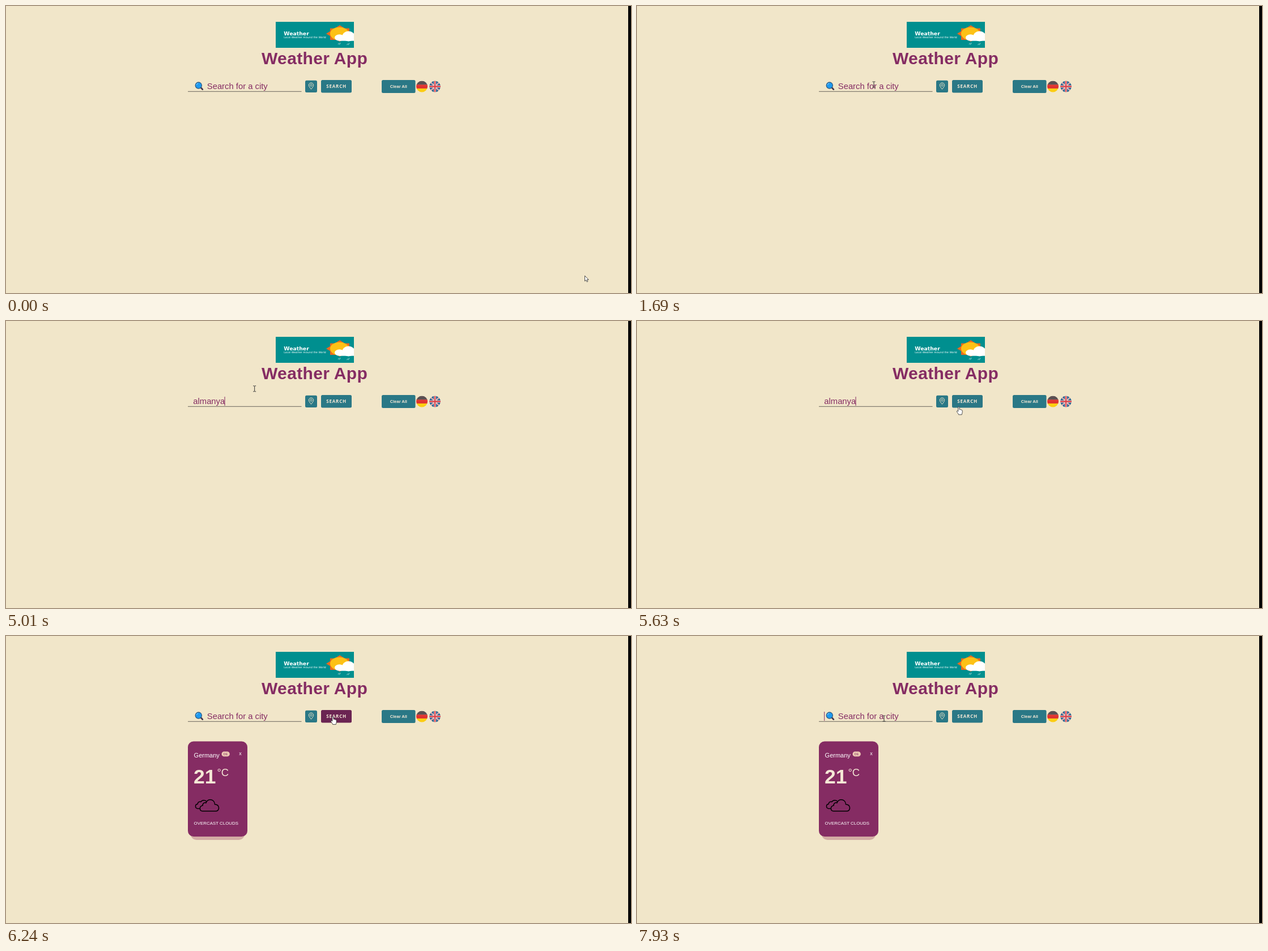
Write an HTML page that moves like this. It is 1103 px wide and 508 px high and loops after 8 s.

```html
<!DOCTYPE html>
<html lang="en">
<head>
<meta charset="utf-8">
<title>Weather App</title>
<style>
html, body { margin: 0; width: 100%; height: 100%; overflow: hidden; background: #f1e6c9; }
svg { display: block; width: 1103px; height: 508px; }
text { font-family: "Liberation Sans", Arial, sans-serif; white-space: pre; }
.b { font-weight: bold; }
.wide { font-family: "DejaVu Sans", sans-serif; fill: #fff; }
.label { font: bold 8px "Open Sans", sans-serif; letter-spacing: .8px; }
.btn { fill: #2a7886; }
.cream { fill: #f5e8d6; }
.plum { fill: #852c63; }
.input { font-size: 14.8px; }
</style>
</head>
<body>
<svg viewBox="0 0 1103 508">
  <defs>
    <clipPath id="banner"><rect x="476" y="28" width="138" height="46"/></clipPath>
    <clipPath id="disc"><circle r="10"/></clipPath>
  </defs>
  <rect width="1103" height="508" fill="#f1e6c9"/>
  <rect x="1098" width="5" height="508"/>

  <g clip-path="url(#banner)">
    <rect x="476" y="28" width="138" height="46" fill="#008f8f"/>
    <text class="wide b" x="490.3" y="51.5" font-size="9.3">Weather</text>
    <text class="wide" x="490.3" y="56.6" font-size="4.6">Local Weather Around the World</text>
    <path d="M572 39.5H606V60H572ZM565 49L589 34L613 49L589 63Z" fill="#ec6a1f"/>
    <ellipse cx="588.5" cy="49" rx="16.5" ry="11.5" fill="#fdc116"/>
    <g fill="#fff">
      <ellipse cx="588.5" cy="56" rx="8.5" ry="5.7"/>
      <ellipse cx="604.5" cy="53.5" rx="11" ry="9"/>
      <rect x="588" y="52" width="27" height="9.7"/>
    </g>
    <path d="M586 68l2-2.5M588.3 68.5l2-3.5M601.5 69l2-2.5M604 69l2-3.5" stroke="#8ccaca" stroke-width="1.1"/>
  </g>
  <text class="b plum" x="451" y="102.7" font-size="30" letter-spacing=".35">Weather App</text>

  <path d="M321 151.3H521.5" stroke="#5b5650" stroke-width=".9"/>
  <g id="hint">
    <path d="M344 144.5L346.8 147.6" stroke="#4b3a4d" stroke-width="2.8" stroke-linecap="round"/>
    <circle cx="339.8" cy="140.6" r="5.6" fill="#1e9af0" stroke="#335c80" stroke-width="1.3"/>
    <path d="M336.3 139.7a3.6 3.6 0 0 1 3-2.9" fill="none" stroke="#8fd3ff"/>
    <text class="input plum" x="354.8" y="147">Search for a city</text>
  </g>
  <text id="typed" class="input plum" x="330.3" y="147"></text>
  <rect id="caret" class="plum" y="134" width="1" height="16"/>

  <rect class="btn" x="528" y="131.7" width="21" height="21.3" rx="2.5"/>
  <path d="M538.5 147.3C536.5 144.5 534.3 142.3 534.3 140.2a4.2 4.2 0 0 1 8.4 0C542.7 142.3 540.5 144.5 538.5 147.3Z" fill="none" stroke="#f1e6c9"/>
  <circle cx="538.5" cy="140.2" r="1.8" fill="none" stroke="#f1e6c9" stroke-width=".9"/>
  <rect id="search" x="556" y="131" width="54" height="22.5" rx="2.5"/>
  <text class="label cream" x="565.3" y="145">SEARCH</text>
  <rect class="btn" x="663" y="131" width="59.5" height="23" rx="2.5"/>
  <text class="b cream" x="677.8" y="145" font-size="7.5">Clear All</text>

  <g transform="translate(734 142.5)"><g clip-path="url(#disc)">
    <path d="M-10-10h20v7h-20z" fill="#5b5052"/>
    <path d="M-10-3.3h20v7h-20z" fill="#e0342f"/>
    <path d="M-10 3.5h20v7h-20z" fill="#fbce12"/>
  </g></g>
  <g transform="translate(757 142.5)"><g clip-path="url(#disc)">
    <circle r="10" fill="#28618f"/>
    <path d="M-9-9L9 9M9-9L-9 9" stroke="#f3e6e0" stroke-width="2.2"/>
    <path d="M-9-9L9 9M9-9L-9 9" stroke="#d9424a" stroke-width=".8"/>
    <path d="M-10 0H10M0-10V10" stroke="#f3e6e0" stroke-width="4"/>
    <path d="M-10 0H10M0-10V10" stroke="#d9424a" stroke-width="2.3"/>
  </g></g>

  <g id="card">
    <rect x="326" y="200" width="95" height="161" rx="10" fill="#d3aba3"/>
    <rect class="plum" x="321" y="186.5" width="105" height="168.5" rx="10"/>
    <text x="331.6" y="215.3" font-size="11" fill="#fff">Germany</text>
    <rect x="380.5" y="204.5" width="14.3" height="8.8" rx="4.4" fill="#eecbb4"/>
    <text x="383.6" y="211" font-size="5.8" class="plum">DE</text>
    <text x="411.3" y="211.3" font-size="9" fill="#fff">x</text>
    <text class="b cream" x="331" y="260.8" font-size="35.5">21</text>
    <text class="cream" x="372.4" y="248" font-size="18.5">°C</text>
    <g fill="none" stroke="#000" stroke-width="1.5" stroke-linejoin="round">
      <path d="M347 310H370.5C377.5 309.5 377.5 298.5 368.5 298C368 287.5 354.5 287.5 353 295.5C349.5 294 346.5 297 347.3 300C340.5 301 341 309.5 347 310Z"/>
      <path d="M342.5 305.5H338C333 304.5 333.5 297.5 338.2 297.5C338 294 341.5 292.5 343.7 293.7C346 289.5 352 290 354 293"/>
    </g>
    <text x="331.6" y="334.3" font-size="7.9" fill="#fff">OVERCAST CLOUDS</text>
  </g>

  <g id="cursor">
    <path id="arrow" d="M.5.5V10L2.7 8L4.2 11.3L5.8 10.6L4.4 7.4H7.2Z" fill="#fff" stroke="#222" stroke-width=".8"/>
    <path id="beam" d="M-2.5-5H-.6L0-4.5L.6-5H2.5M0-4.5V4.5M-2.5 5H-.6L0 4.5L.6 5H2.5" fill="none" stroke="#333"/>
    <path id="hand" d="M-1.2 8V.6C-1.2-.9 1-.9 1 .6V4.4C1.6 3.7 2.8 4 2.9 4.9C3.6 4.3 4.6 4.7 4.7 5.5C5.4 5 6.2 5.5 6.2 6.4V9.5C6.2 11 5.3 11.8 5.2 13.6H-.4C-.6 11.7-2.6 10.2-3.6 8.2C-4 7-2.7 6.3-1.9 7.2Z" fill="#fff" stroke="#222" stroke-width=".8"/>
  </g>
</svg>
<script>
const $ = id => document.getElementById(id);
const LOOP = 8000, TICK = 68.5, BLINK = 530;

// pow: how strongly a move slows down; the path sways by sway * sin(turns * PI * progress)
const home = { x: 1021, y: 477 };
const moves = [
  { from: 0, to: 822, x: 424, y: 148.5, pow: 1.2, sway: 0, turns: 0 },
  { from: 822, to: 1370, x: 418, y: 139, pow: 3, sway: 0, turns: 0 },
  { from: 4932, to: 5754, x: 577, y: 143, pow: 1.6, sway: -27, turns: 2 },
  { from: 6781, to: 7877, x: 436, y: 146, pow: 2.2, sway: 3, turns: 1 }
];
const word = "almanya", keys = [2820, 3220, 3420, 3550, 3680, 4470, 4550];
const focus = 1160, blur = 5700, submit = 5840, loaded = 6240, refocus = 7600;
const idle = [42, 120, 134], hover = [107, 36, 82];

const show = (id, on) => $(id).setAttribute("visibility", on ? "visible" : "hidden");
const clamp = p => Math.min(1, Math.max(0, p));
const ease = p => (p = clamp(p), p * p * (3 - 2 * p));

function pointer(t) {
  let { x, y } = home;
  for (const m of moves) {
    const q = 1 - (1 - clamp((t - m.from) / (m.to - m.from))) ** m.pow;
    x += (m.x - x) * q;
    y += (m.y - y) * q + m.sway * Math.sin(m.turns * Math.PI * q);
  }
  const shape = x < 521 && y > 100 && y < 148 ? "beam"
    : x > 521 && x < 610 && y > 131 && y < 154 ? "hand" : "arrow";
  $("cursor").setAttribute("transform", `translate(${x} ${y})`);
  for (const s of ["arrow", "beam", "hand"]) show(s, s === shape);
}

function draw(t) {
  const count = t < submit ? keys.filter(k => k <= t).length : 0;
  $("typed").textContent = word.slice(0, count);
  show("hint", !count);

  const focused = t >= focus && t < blur || t >= refocus;
  const touched = [focus, ...keys, refocus].findLast(k => k <= t);
  $("caret").setAttribute("x", 330.2 + (count ? $("typed").getComputedTextLength() - .6 : 0));
  show("caret", focused && Math.floor((t - touched) / BLINK) % 2 === 0);

  const h = ease((t - 5600) / 450) - ease((t - 6900) / 450);
  $("search").setAttribute("fill", `rgb(${idle.map((c, i) => Math.round(c + (hover[i] - c) * h))})`);
  show("card", t >= loaded);
  pointer(Math.floor(t / TICK) * TICK);
}

const start = performance.now();
function frame() {
  draw((performance.now() - start) % LOOP);
  requestAnimationFrame(frame);
}
frame();
</script>
</body>
</html>
```
